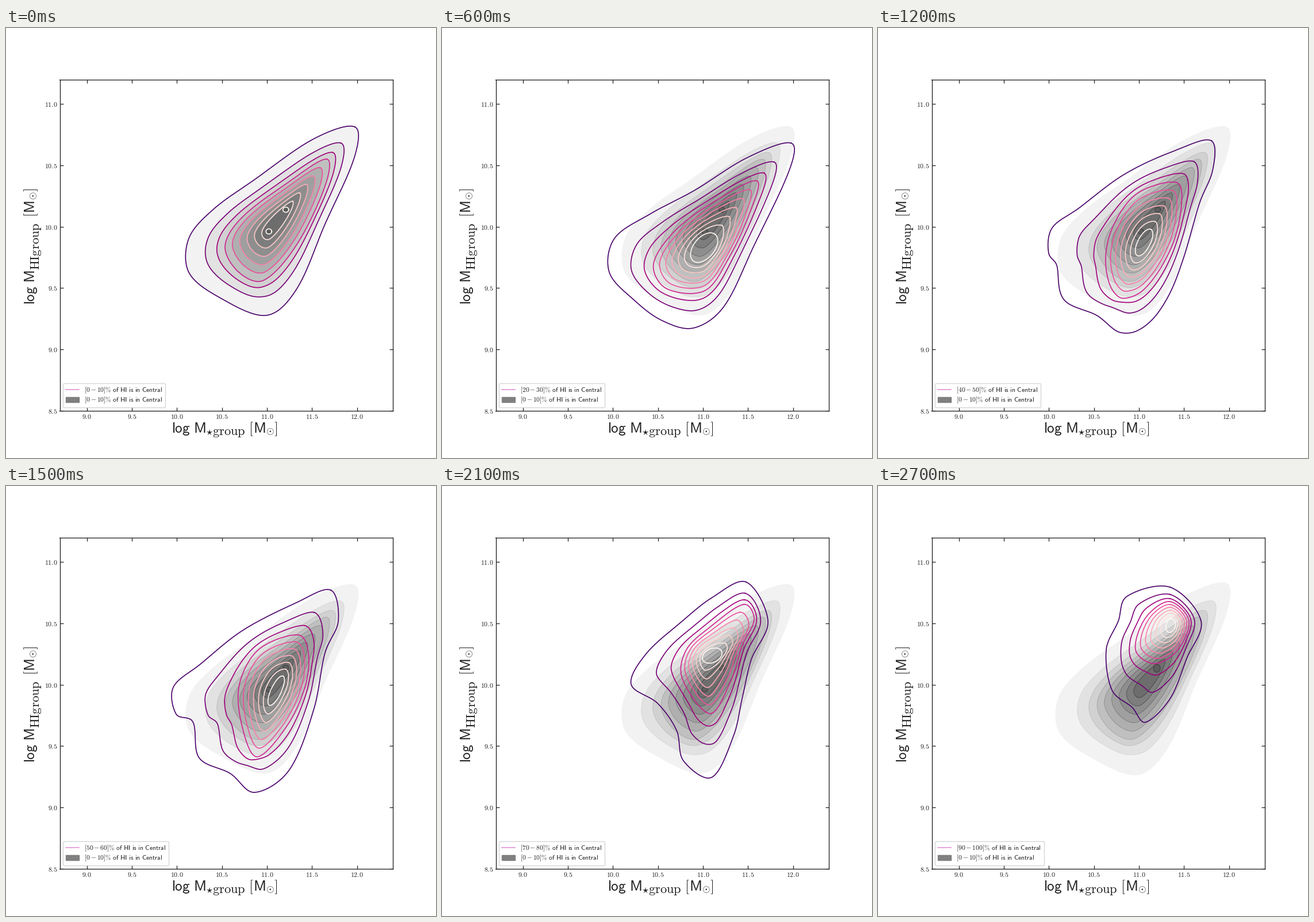
Recreate the animation shown at these times as a matplotlib script. Size 748 px wide and 748 px high, loop 3 s.

```python
import numpy as np
import matplotlib.pyplot as plt
from matplotlib.animation import FuncAnimation
from matplotlib.patches import Patch, Polygon
from matplotlib.lines import Line2D
from matplotlib.transforms import Affine2D

SIZE = 748
STEPS = 10
LEVELS = 10
MID = 3
INK = "0.12"
plt.rcParams["mathtext.fontset"] = "cm"


def smooth(points, samples=240):
    """Closed cubic through a few points, resampled evenly along its length."""
    p = np.array(points, float)
    after = np.roll(p, -1, axis=0)
    span = np.sqrt(np.hypot(*(after - p).T))[:, None]
    slope = (after - np.roll(p, 1, axis=0)) / (span + np.roll(span, 1, axis=0))
    t = np.linspace(0, 1, 24, endpoint=False)[None, :, None]
    start, end = (slope * span)[:, None], (np.roll(slope, -1, axis=0) * span)[:, None]
    ease = 3 * t**2 - 2 * t**3
    curve = (p[:, None] * (1 - ease) + after[:, None] * ease
             + start * t * (1 - t)**2 - end * t**2 * (1 - t)).reshape(-1, 2)
    curve = np.vstack([curve, curve[:1]])
    length = np.r_[0, np.cumsum(np.hypot(*np.diff(curve, axis=0).T))]
    at = np.linspace(0, length[-1], samples)
    return np.column_stack([np.interp(at, length, col) for col in curve.T])


def ellipse(x, y, major, minor, tilt=0, samples=240):
    t, a = np.linspace(0, 2 * np.pi, samples), np.radians(tilt)
    along, across = major * np.cos(t), minor * np.sin(t)
    return np.column_stack([x + along * np.cos(a) - across * np.sin(a),
                            y - along * np.sin(a) - across * np.cos(a)])


def mix(a, b, w):
    return (1 - w) * a + w * b


def contours(outer, mid, peak):
    """Nested rings: an exponential tail outside, even steps up to the peak."""
    outer, mid, peak = smooth(outer), smooth(mid), ellipse(*peak)
    tail = [mix(outer, mid, np.log(k + 1) / np.log(MID + 1)) for k in range(MID)]
    return tail + [mix(mid, peak, w) for w in np.linspace(0, 1, LEVELS - MID)]


# Corners in pixels, from the upper right tip over the top to the left.
shapes = {
    0: contours(
        [(607, 172), (535, 193), (432, 264), (360, 316), (318, 366), (318, 425),
         (370, 468), (452, 500), (505, 455), (555, 341), (606, 225)],
        [(558, 228), (490, 269), (410, 330), (381, 380), (405, 425), (448, 439),
         (505, 378), (555, 275)],
        (472, 335, 24, 4, 52)),
}
shapes[1] = contours(
    [(612, 178), (551, 201), (474, 250), (391, 309), (315, 354), (298, 420),
     (325, 462), (401, 491), (462, 503), (498, 458), (556, 338), (614, 220)],
    [(557, 252), (498, 281), (415, 338), (361, 400), (390, 435), (450, 456),
     (504, 390), (545, 307)],
    (459, 363, 30, 15, 54))
shapes[2] = contours(
    [(607, 200), (530, 226), (440, 282), (363, 323), (300, 366), (291, 425),
     (335, 474), (383, 509), (437, 522), (490, 485), (542, 380), (605, 245)],
    [(548, 266), (480, 298), (408, 350), (368, 410), (390, 453), (457, 457),
     (500, 398), (536, 320)],
    (456, 382, 30, 18, 50))
shapes[3] = contours(
    [(599, 215), (525, 227), (447, 260), (365, 316), (313, 350), (295, 412),
     (305, 470), (370, 500), (435, 532), (498, 475), (540, 380), (580, 283)],
    [(534, 281), (470, 290), (425, 330), (382, 400), (390, 456), (447, 473),
     (500, 410), (528, 330)],
    (454, 394, 23, 13, 58))
shapes[5] = contours(
    [(565, 181), (505, 203), (412, 251), (338, 310), (291, 350), (296, 397),
     (325, 410), (336, 473), (390, 500), (432, 533), (492, 495), (535, 390),
     (555, 290), (578, 235)],
    [(508, 259), (440, 284), (406, 345), (410, 415), (436, 471), (487, 420),
     (520, 350), (526, 290)],
    (470, 356, 28, 9, 65))
shapes[7] = contours(
    [(529, 167), (470, 194), (418, 235), (355, 292), (329, 345), (375, 378),
     (408, 425), (420, 478), (469, 507), (507, 435), (522, 370), (538, 302),
     (567, 235)],
    [(525, 206), (468, 244), (425, 285), (418, 335), (466, 396), (502, 340),
     (522, 278), (543, 232)],
    (470, 295, 18, 12, 25))
shapes[9] = contours(
    [(508, 176), (433, 192), (418, 235), (397, 285), (407, 355), (442, 385),
     (465, 411), (508, 370), (537, 300), (562, 235)],
    [(507, 201), (465, 230), (448, 285), (480, 309), (520, 287), (541, 235)],
    (509, 243, 12, 8, 75))
for step in (4, 6, 8):
    shapes[step] = [mix(a, b, 0.55) for a, b in zip(shapes[step - 1], shapes[step + 1])]

# The ridge of the first group splits into two small summits at its ends.
ridge = shapes[0][-1]
twin_peaks = [ellipse(*ridge[i], 5, 4.5) for i in (0, len(ridge) // 2)]
single_peak = ellipse(485, 317, 6, 7)
shapes[0][-1] = np.vstack([twin_peaks[0], [[np.nan, np.nan]], twin_peaks[1]])
base = shapes[0][0]
wide_base = (base - [614, 335]) * [1.013, 1.018] + [614, 335]

fig = plt.figure(figsize=(SIZE / 100, SIZE / 100), dpi=100, facecolor="white")
ax = fig.add_subplot()
PX = Affine2D().scale(1 / SIZE, -1 / SIZE).translate(0, 1) + fig.transFigure

tones = np.linspace(0.95, 0.36, LEVELS)


def grey(points, k):
    edge = "none" if k == 0 else str(tones[k] * (1 - 0.06 * k))
    return ax.add_patch(Polygon(points, facecolor=str(tones[k]), edgecolor=edge,
                                lw=0.5, transform=PX, zorder=1))


greys = [grey(shapes[0][k], k) for k in range(LEVELS - 1)]
peaks = [grey(p, LEVELS - 1) for p in twin_peaks]

ramp = plt.get_cmap("RdPu_r")
lines = [ax.plot([], [], color=ramp(k / (LEVELS - 1)), lw=1.2, transform=PX, zorder=2)[0]
         for k in range(LEVELS)]

ax.set(xlim=(8.7, 12.4), ylim=(8.5, 11.2))
xticks, yticks = np.arange(9, 12.1, 0.5), np.arange(8.5, 11.1, 0.5)
ax.set_xticks(xticks, [f"${v:.1f}$" for v in xticks])
ax.set_yticks(yticks, [f"${v:.1f}$" for v in yticks])
ax.tick_params(direction="in", top=True, right=True, length=4, width=0.9, pad=3,
               color=INK, labelcolor=INK, labelsize=8.5)
for spine in ax.spines.values():
    spine.set(color=INK, linewidth=0.95)


def axis_label(x, y, parts, vertical=False):
    """Each part: advance along the baseline, drop below it, size, text."""
    for along, drop, size, text in parts:
        px, py = (x + drop, y - along) if vertical else (x + along, y + drop)
        fig.text(px / SIZE, 1 - py / SIZE, f"${text}$", size=size, color=INK,
                 rotation=90 if vertical else 0, rotation_mode="anchor",
                 ha="left", va="baseline")


def unit(start):
    return [(start, 0, 18, r"\mathsf{[}"), (start + 7.5, 0, 18, r"\mathsf{M}"),
            (start + 30, 2.5, 12.5, r"\odot"), (start + 44, 0, 18, r"\mathsf{]}")]


mass = (0, 0, 18, r"\mathsf{log\ M}")
axis_label(288, 704, [mass, (59, 4, 12.5, r"\star"),
                      (71, 4, 16.2, r"\mathrm{group}")] + unit(134))
axis_label(50, 481, [mass, (60, 8.5, 16.2, r"\mathrm{HIgroup}")] + unit(152), vertical=True)


def caption(step):
    return rf"$\mathsf{{[{10 * step} - {10 * step + 10}]\%\ of\ HI\ is\ in\ Central}}$"


legend = ax.legend([Line2D([], [], color="#e094dc", lw=1.2), Patch(color="#808080")],
                   [caption(0), caption(0)], loc="lower left", fontsize=8.35,
                   labelspacing=0.15, labelcolor=INK, edgecolor="0.8")


def draw(step):
    for line, points in zip(lines, shapes[step]):
        line.set_data(*points.T)
    late = step >= 8
    greys[0].set_xy(wide_base if late else base)
    peaks[0].set_xy(single_peak if late else twin_peaks[0])
    peaks[1].set_visible(not late)
    legend.get_texts()[0].set_text(caption(step))
    return lines


animation = FuncAnimation(fig, draw, frames=STEPS, interval=300, repeat=True, blit=False)
plt.show()
```
